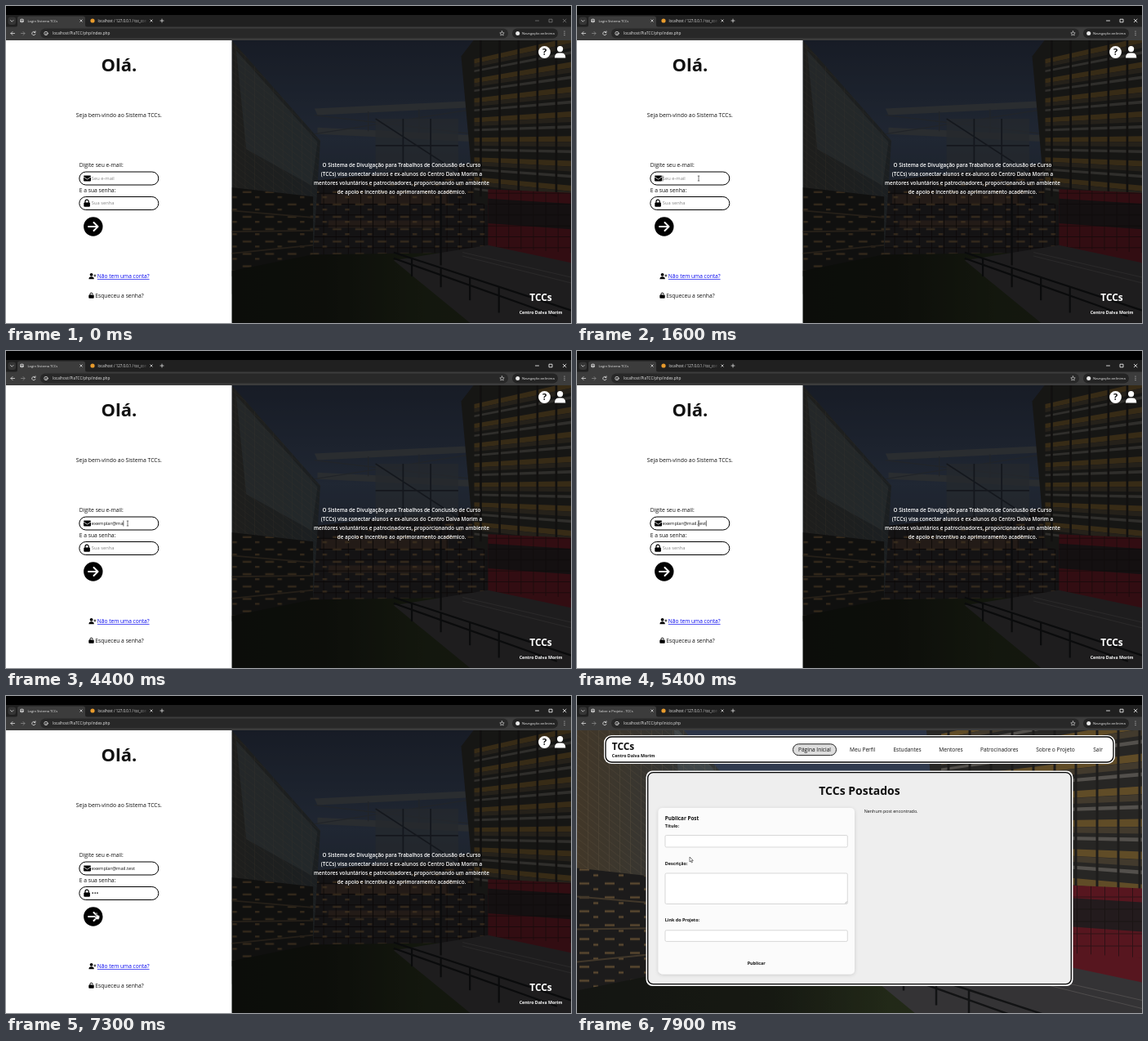
An HTML page that plays this animation: 692x388 px, repeating every 8 s.

```html
<!DOCTYPE html>
<html lang="pt-BR">
<head>
<meta charset="utf-8">
<title>Sistema TCCs</title>
<style>
html, body { margin: 0; width: 100%; height: 100%; overflow: hidden; background: #000; }
svg { display: block; width: 100vw; height: 100vh; }
text { font-family: "Open Sans", "Noto Sans", sans-serif; font-size: 6.75px; fill: #111; white-space: pre; }
.b { font-weight: 700; }
.mid { text-anchor: middle; }
.white text, text.white { fill: #fff; }
.chrome text { fill: #e8e8e8; font-size: 4.1px; }
.field text { font-size: 5.75px; }
.field .hint { fill: #858585; }
.label text { font-size: 5.4px; font-weight: 700; }
.nav text { font-size: 6.6px; }
.line { fill: none; stroke: #ddd; stroke-width: .8; stroke-linecap: round; stroke-linejoin: round; }
.intro text { font-size: 6.36px; font-weight: 600; }
</style>
</head>
<body>
<svg viewBox="0 0 692 388" preserveAspectRatio="none">
<defs>
  <linearGradient id="sky" x2="0" y2="1">
    <stop offset="0" stop-color="#3a465f"/><stop offset=".35" stop-color="#50617f"/><stop offset="1" stop-color="#2b3038"/>
  </linearGradient>
  <linearGradient id="glass">
    <stop offset="0" stop-color="#5e4f3a"/><stop offset=".45" stop-color="#4c4c48"/><stop offset="1" stop-color="#454e54"/>
  </linearGradient>
  <linearGradient id="lawn">
    <stop offset="0" stop-color="#1c1e1a"/><stop offset=".35" stop-color="#20241a"/><stop offset=".55" stop-color="#303a22"/><stop offset="1" stop-color="#34352f"/>
  </linearGradient>
  <pattern id="lattice" width="13" height="9" patternUnits="userSpaceOnUse" patternTransform="skewY(38)">
    <path d="M0 0H13M0 0V9" fill="none" stroke="#a8946f" stroke-opacity=".35"/>
  </pattern>
  <pattern id="panes" width="17" height="15" patternUnits="userSpaceOnUse">
    <path d="M0 0H17M0 0V15" fill="none" stroke="#1c1514" stroke-width="2"/>
  </pattern>
  <pattern id="lamps" width="31" height="17" patternUnits="userSpaceOnUse">
    <path d="M3 5H15M20 12H26" stroke="#a98451" stroke-width="2.5" stroke-opacity=".7"/>
  </pattern>
  <g id="photo">
    <rect width="692" height="389" fill="url(#sky)"/>
    <path d="M215 195L480 165V310H215Z" fill="#332f33"/>
    <path d="M235 212H410V226H235ZM245 248H400V258H245Z" fill="#74523f" opacity=".6"/>
    <path d="M215 195L480 165V310H215Z" fill="url(#panes)"/>
    <path d="M215 205L480 185V300H215Z" fill="url(#lamps)"/>
    <path d="M0 0H112L234 138L223 310L0 389Z" fill="url(#glass)"/>
    <path d="M118 14L230 140L222 200L132 150Z" fill="#66747a" opacity=".6"/>
    <path d="M0 0H112L234 138L223 310L0 389Z" fill="url(#lattice)"/>
    <path d="M0 190L224 215V300L0 350Z" fill="#282726"/>
    <path d="M0 190L224 215V300L0 350Z" fill="url(#lamps)"/>
    <path d="M0 225L224 244M0 265L224 262M0 305L224 282" fill="none" stroke="#5d4f3c" stroke-width="2"/>
    <path d="M226 94L470 82V91L230 103ZM230 120L470 132V141L230 129Z" fill="#697078"/>
    <path d="M226 103L470 132M226 129L470 91M300 98V125M370 95V128" fill="none" stroke="#535b66" stroke-width="1.5"/>
    <path d="M310 108H424V182H310Z" fill="#5d6670" opacity=".75"/>
    <path d="M310 108L424 182M310 145H424M348 108V182M386 108V182" fill="none" stroke="#323a49" stroke-width="2"/>
    <path d="M428 22L445 0H692V290L446 222Z" fill="#383633"/>
    <g id="floors"></g>
    <path d="M465 205L692 215V335L465 297Z" fill="#7d202c"/>
    <path d="M465 218L692 232V268L465 252Z" fill="#32272a"/>
    <path d="M465 205L692 215V300L465 285Z" fill="url(#panes)" opacity=".6"/>
    <path d="M0 340L223 295L465 292L692 330V389H0Z" fill="url(#lawn)"/>
    <path d="M335 303L465 282L692 330V389H440Z" fill="#4b494c"/>
    <path d="M335 292L580 372M335 300L560 380M360 300V325M400 313V340M440 326V358M480 340V375M400 185V310" fill="none" stroke="#1a1b1d" stroke-width="2.5"/>
    <path d="M430 292L692 352M430 297L692 362" fill="none" stroke="#6f6c6c"/>
  </g>
  <clipPath id="right"><path d="M276.8 42H692V388H276.8Z"/></clipPath>
  <clipPath id="page"><path d="M0 42H692V388H0Z"/></clipPath>
  <linearGradient id="fade"><stop offset=".85" stop-color="#202020" stop-opacity="0"/><stop offset="1" stop-color="#202020"/></linearGradient>
  <filter id="shadow" x="-10%" y="-10%" width="120%" height="120%"><feDropShadow dx="0" dy="1" stdDeviation="2" flood-opacity=".15"/></filter>
</defs>

<rect width="692" height="388"/>

<g class="chrome">
  <path d="M0 11H692V26H0Z" fill="#202020"/>
  <path d="M0 25.5H692V42H0Z" fill="#3c3c3c"/>
  <path d="M11 26Q14 26 14 23V15Q14 12.5 17 12.5H94Q97 12.5 97 15V23Q97 26 100 26Z" fill="#3c3c3c"/>
  <rect x="2.5" y="13.5" width="9.5" height="9.5" rx="3" fill="#353535"/>
  <path class="line" d="M5.5 17.5L7.3 19.2L9 17.5"/>
  <circle cx="19.5" cy="18" r="2.4" fill="#ddd"/>
  <path d="M17.3 17.4H21.7M19.5 15.7V20.3" stroke="#3c3c3c" stroke-width=".6"/>
  <text id="tab" x="26.5" y="19.6"></text>
  <path class="line" d="M90.8 16.8L93.2 19.2M93.2 16.8L90.8 19.2"/>
  <circle cx="106" cy="18" r="2.6" fill="#e79a2c"/>
  <text x="112.5" y="19.6" style="font-size:4.4px">localhost / 127.0.0.1 / tcc_con</text>
  <rect x="112" y="14" width="61" height="9" fill="url(#fade)"/>
  <path class="line" d="M176.8 16.8L179.2 19.2M179.2 16.8L176.8 19.2M189 18H193M191 16V20"/>
  <path id="controls" class="line" d="M648.5 18H652.5M665.4 16.2H669V19.8H665.4ZM682.3 16.2L686 19.8M686 16.2L682.3 19.8"/>
  <path class="line" d="M10.5 33.5H6M8 31.5L6 33.5L8 35.5"/>
  <path class="line" d="M18.5 33.5H23M21 31.5L23 33.5L21 35.5" style="stroke:#888"/>
  <path class="line" d="M35.5 32A2.2 2.2 0 1 0 36 34.3M36 30.8V32.5H34.3"/>
  <rect x="42" y="27.5" width="573" height="12" rx="6" fill="#282828"/>
  <circle class="line" cx="49" cy="33.5" r="2.2"/>
  <path class="line" d="M49 33.3V34.6"/>
  <text id="url" x="57" y="35.2" style="font-size:4.72px"></text>
  <path class="line" d="M607.5 30.8L608.3 32.7L610.2 32.9L608.8 34.2L609.2 36L607.5 35.1L605.8 36L606.2 34.2L604.8 32.9L606.7 32.7Z" style="stroke-width:.6"/>
  <rect x="620" y="27.5" width="56" height="12" rx="6" fill="#242424"/>
  <circle cx="626.7" cy="33.5" r="2.5" fill="#e8e8e8"/>
  <text x="632" y="35.1" style="font-size:4.2px">Navegação anônima</text>
  <path d="M684 31V36.5" stroke="#ddd" stroke-width="1.1" stroke-linecap="round" stroke-dasharray="0 2.3"/>
</g>

<g id="login">
  <path d="M0 42H276.8V388H0Z" fill="#fff"/>
  <g clip-path="url(#right)">
    <use href="#photo" transform="translate(177 42) scale(.889)"/>
    <path d="M276.8 42H692V388H276.8Z" opacity=".6"/>
  </g>
  <text class="b mid" x="138.5" y="79.9" style="font-size:22px">Olá.</text>
  <text class="mid" x="138.3" y="135.9" style="font-size:6.85px">Seja bem-vindo ao Sistema TCCs.</text>
  <text x="89.7" y="197.3">Digite seu e-mail:</text>
  <text x="89.7" y="227.8">E a sua senha:</text>
  <g fill="#fff" stroke="#000">
    <rect x="89.8" y="203" width="97" height="16" rx="8"/>
    <rect x="89.8" y="233.5" width="97" height="16" rx="8"/>
  </g>
  <rect x="95" y="207.6" width="9" height="7" rx="1"/>
  <path d="M95 209.2L99.5 212.2L104 209.2" fill="none" stroke="#fff" stroke-width=".8"/>
  <rect x="95.3" y="240.6" width="7.6" height="5.2" rx="1"/>
  <path d="M97 241V239.3A2.1 2.1 0 0 1 101.2 239.3V241" fill="none" stroke="#000" stroke-width="1.2"/>
  <g class="field">
    <text id="email" x="104.8" y="213"></text>
    <text id="password" x="104.8" y="243.4"></text>
  </g>
  <path id="caret" stroke="#000" stroke-width=".6"/>
  <circle cx="106.8" cy="270" r="11.7"/>
  <path d="M101 270H112M107.5 265L112.5 270L107.5 275" fill="none" stroke="#fff" stroke-width="2" stroke-linecap="round" stroke-linejoin="round"/>
  <circle cx="104.6" cy="328.8" r="1.9"/>
  <path d="M101.4 334.2Q101.4 331.3 104.6 331.3T107.8 334.2Z"/>
  <path d="M107.4 330H110.4M108.9 328.5V331.5" stroke="#000" stroke-width=".8"/>
  <text x="111.8" y="333.1" style="font-size:6.6px;fill:#00e;text-decoration:underline .4px">Não tem uma conta?</text>
  <rect x="101.3" y="353.6" width="6.4" height="4.2" rx=".8"/>
  <path d="M103 354V352.6A1.5 1.5 0 0 1 106 352.6V353" fill="none" stroke="#000"/>
  <text x="109.2" y="356.8">Esqueceu a senha?</text>
  <g class="white mid intro">
    <text x="484.5" y="197.2">O Sistema de Divulgação para Trabalhos de Conclusão de Curso</text>
    <text x="484.5" y="208.2">(TCCs) visa conectar alunos e ex-alunos do Centro Dalva Morim a</text>
    <text x="484.5" y="219.2">mentores voluntários e patrocinadores, proporcionando um ambiente</text>
    <text x="484.5" y="230.2">de apoio e incentivo ao aprimoramento acadêmico.</text>
  </g>
  <circle cx="659.5" cy="56.5" r="7.4" fill="#fff"/>
  <text class="b mid" x="659.5" y="60.4" style="font-size:11px">?</text>
  <circle cx="678.6" cy="52.6" r="3.6" fill="#fff"/>
  <path d="M672 63.5Q672 57.6 677 57.6H680.2Q685.3 57.6 685.3 63.5Z" fill="#fff"/>
  <g class="white b mid">
    <text x="655" y="361.3" style="font-size:11.9px">TCCs</text>
    <text x="655" y="376.9" style="font-size:5.25px">Centro Dalva Morim</text>
  </g>
</g>

<g id="home">
  <g clip-path="url(#page)">
    <use href="#photo" y="20.5"/>
    <path d="M0 42H692V388H0Z" opacity=".3"/>
  </g>
  <rect x="33" y="48" width="626" height="35" rx="9" fill="#fff"/>
  <rect x="35" y="50" width="622" height="31" rx="7.5" fill="#fff" stroke="#000" stroke-width="1.3"/>
  <rect x="84.5" y="91.5" width="523" height="263.5" rx="8" fill="#fff"/>
  <rect x="86.7" y="93.7" width="518.6" height="259" rx="6.5" fill="#eee" stroke="#000" stroke-width="1.3"/>
  <text class="b" x="42.8" y="65.7" style="font-size:11.9px">TCCs</text>
  <text class="b" x="42.8" y="75.1" style="font-size:5.25px">Centro Dalva Morim</text>
  <rect x="264.5" y="58.8" width="53" height="13.8" rx="6.9" fill="#ddd" stroke="#222"/>
  <g class="nav">
    <text class="mid" x="291" y="67.9">Página Inicial</text>
    <text class="mid" x="349.7" y="67.9">Meu Perfil</text>
    <text class="mid" x="404.5" y="67.9">Estudantes</text>
    <text class="mid" x="458" y="67.9">Mentores</text>
    <text class="mid" x="517.3" y="67.9">Patrocinadores</text>
    <text class="mid" x="586" y="67.9">Sobre o Projeto</text>
    <text class="mid" x="638" y="67.9">Sair</text>
  </g>
  <text class="b mid" x="346" y="120.7" style="font-size:14px">TCCs Postados</text>
  <rect x="99.5" y="137" width="240.5" height="203.5" rx="5" fill="#fbfbfb" filter="url(#shadow)"/>
  <text class="b" x="107.8" y="152.2" style="font-size:6.35px">Publicar Post</text>
  <g class="label">
    <text x="107.8" y="160.6">Título:</text>
    <text x="107.8" y="206.5">Descrição:</text>
    <text x="107.8" y="276.3">Link do Projeto:</text>
    <text class="mid" x="219.7" y="329.4">Publicar</text>
  </g>
  <g fill="#fff" stroke="#c8c8c8" stroke-width=".7">
    <rect x="108" y="170.5" width="223.3" height="14.5" rx="1.5"/>
    <rect x="108" y="217" width="223.3" height="37.5" rx="1.5"/>
    <rect x="108" y="286.8" width="223.3" height="13.6" rx="1.5"/>
  </g>
  <path d="M328.5 253.6L330.6 251.5M329.8 253.6L330.6 252.8" stroke="#777" stroke-width=".5"/>
  <text x="351.8" y="142.6" style="font-size:5.35px">Nenhum post encontrado.</text>
</g>

<g id="cursor">
  <path id="arrow" d="M0 0V6L1.4 4.8L2.4 7L3.4 6.5L2.4 4.4H4.3Z" fill="#fff" stroke="#222" stroke-width=".6"/>
  <path id="beam" d="M-1.2 -3H1.2M0 -3V3M-1.2 3H1.2" stroke="#222" stroke-width=".6"/>
  <path id="hand" d="M-.7 .7Q0 -.6 .7 .7V3L3.6 4V6.2L2.6 8.5H-1L-2.8 5.5L-2 4.6L-.7 5.5Z" fill="#fff" stroke="#222" stroke-width=".5"/>
</g>
</svg>

<script>
const LOOP = 8000, STEP = 100, HOME_AT = 7400, FOCUS_AT = 1600;
const EMAIL = "exemplar@mail.test";
// Time at which each character appears
const EMAIL_KEYS = [2100, 2200, 2300, 2500, 2600, 2700, 2900, 3200, 3600, 4000,
  4400, 4500, 4600, 4800, 5000, 5200, 5200, 5400];
const PASSWORD_KEYS = [6500, 6700, 6900];
// Pointer stops: time, x, y
const POINTER = [[700, 300, 330], [1000, 237, 276], [1500, 149, 211], [5800, 149, 211],
  [6300, 142, 241], [6800, 142, 241], [7200, 111, 265], [7600, 111, 265], [7900, 138, 197]];

const $ = id => document.getElementById(id);
const show = (id, on) => $(id).style.display = on ? "" : "none";
const typed = (keys, t) => keys.filter(k => k <= t).length;

function setText(id, value) {
  if ($(id).textContent !== value) $(id).textContent = value;
}

function setField(id, value, hint) {
  setText(id, value || hint);
  $(id).classList.toggle("hint", !value);
}

function pointerAt(t) {
  const i = POINTER.findIndex(p => p[0] > t);
  if (i < 0) return POINTER.at(-1).slice(1);
  const [t0, x0, y0] = POINTER[Math.max(i - 1, 0)], [t1, x1, y1] = POINTER[i];
  const u = Math.max(0, (t - t0) / (t1 - t0)), e = u * u * (3 - 2 * u);
  return [x0 + (x1 - x0) * e, y0 + (y1 - y0) * e];
}

function cursorKind(x, y, home) {
  if (home) return "arrow";
  if (Math.hypot(x - 107, y - 270) < 12) return "hand";
  const inField = x > 90 && x < 187 && [211, 241.5].some(c => Math.abs(y - c) < 8);
  return inField ? "beam" : "arrow";
}

// Lit slabs and railings of the right-hand building, fanning out in perspective
function drawFloors() {
  const slab = (left, right, size, fill) =>
    `<path d="M446 ${left}L692 ${right}V${right + size * 1.6}L446 ${left + size}Z" fill="${fill}"/>`;
  let shapes = "";
  for (let i = 0; i < 7; i++) {
    const left = 26 + i * 27, right = -30 + i * 40;
    shapes += slab(left, right, 6, "#8a6c38") + slab(left + 6, right + 10, 5, "#5e5341") +
      slab(left + 15, right + 23, 3, "#77736c");
  }
  for (let x = 455; x < 692; x += 26)
    shapes += `<path d="M${x} 0V${215 + (x - 455) / 5}" stroke="#2a2826" stroke-width="3"/>`;
  $("floors").innerHTML = shapes;
}

function render(t) {
  const home = t >= HOME_AT;
  show("login", !home);
  show("home", home);
  setText("tab", home ? "Sobre o Projeto - TCCs" : "Login Sistema TCCs");
  setText("url", `localhost/PiaTCC/php/${home ? "inicio" : "index"}.php`);
  $("controls").style.stroke = t < FOCUS_AT ? "#777" : "#fff";

  const email = EMAIL.slice(0, typed(EMAIL_KEYS, t));
  const dots = "•".repeat(typed(PASSWORD_KEYS, t));
  setField("email", email, "Seu e-mail");
  setField("password", dots, "Sua senha");
  $("password").style.fontSize = dots ? "7.6px" : "";
  $("password").setAttribute("y", dots ? 244.4 : 243.4);

  const inPassword = t >= 6300;
  const caretOn = t >= FOCUS_AT && t < 7200;
  show("caret", caretOn);
  if (caretOn) {
    const value = inPassword ? dots : email;
    const width = value ? $(inPassword ? "password" : "email").getComputedTextLength() : 0;
    $("caret").setAttribute("d", `M${105 + width} ${inPassword ? 238 : 207.5}v7`);
  }

  const [x, y] = pointerAt(t), kind = cursorKind(x, y, home);
  show("cursor", t >= POINTER[0][0]);
  $("cursor").setAttribute("transform", `translate(${x} ${y})`);
  for (const k of ["arrow", "beam", "hand"]) show(k, k === kind);
}

function frame() {
  const t = performance.now() % LOOP;
  render(Math.floor(t / STEP) * STEP);
  requestAnimationFrame(frame);
}

drawFloors();
frame();
</script>
</body>
</html>
```
